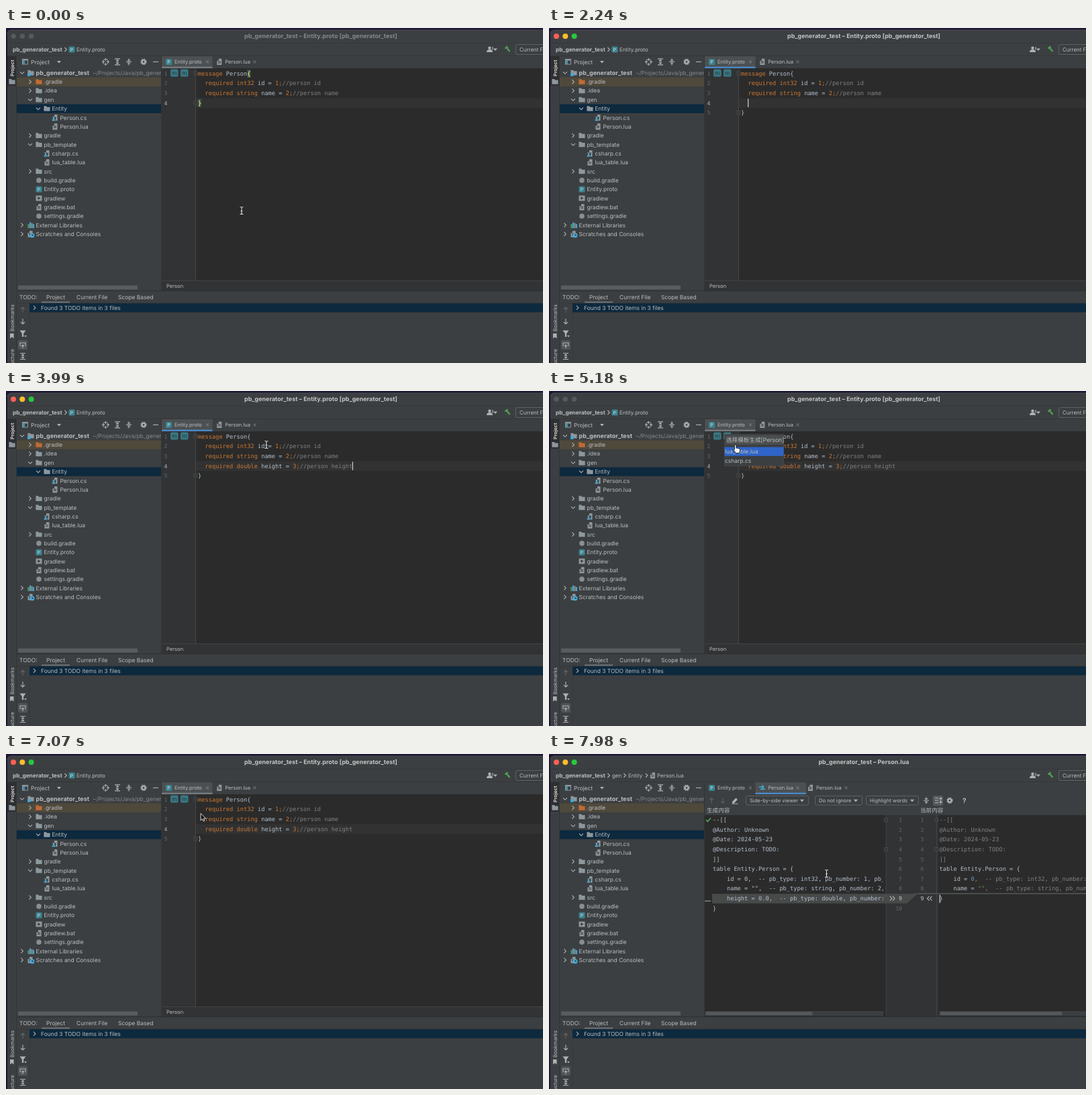
An HTML page that plays this animation: 800 px wide and 499 px high, repeating every 8 s.

```html
<!DOCTYPE html>
<html lang="en">
<head>
<meta charset="utf-8">
<title>Code generator</title>
<style>
html, body { margin: 0; width: 100%; height: 100%; overflow: hidden; background: #1d1533; }
svg { display: block; width: 100vw; height: 100vh; }
text { font: 8.45px Inter, "Noto Sans CJK SC", sans-serif; fill: #bbbdbf; white-space: pre; text-rendering: geometricPrecision; }
.b { font-weight: 700; font-size: 8.95px; }
.h { font-weight: 700; font-size: 8.3px; }
.s { font-size: 7.6px; }
.m { font-size: 7.95px; }
.c { font: 8.7px "DejaVu Sans Mono", monospace; fill: #b3bfcc; }
.n { font: 8.2px "DejaVu Sans Mono", monospace; fill: #63676a; }
.z { font-size: 8.6px; }
.l { fill: none; stroke: #afb1b3; stroke-width: 1.1; }
</style>
</head>
<body>
<svg id="stage" viewBox="0 0 800 499" preserveAspectRatio="none"></svg>
<script>
const CHAR = 5.233;
const rect = (x, y, w, h, fill, extra = '') => `<rect x="${x}" y="${y}" width="${w}" height="${h}" fill="${fill}" ${extra}/>`;
const circle = (x, y, r, fill) => `<circle cx="${x}" cy="${y}" r="${r}" fill="${fill}"/>`;
const text = (x, y, s, cls = '', extra = '') => `<text x="${x}" y="${y}" class="${cls}" ${extra}>${s}</text>`;
const line = (d, extra = '') => `<path class="l" d="${d}" ${extra}/>`;
const shape = (d, fill = '#afb1b3') => `<path d="${d}" fill="${fill}"/>`;
const group = (id, s, extra = '') => `<g id="${id}" ${extra}>${s}</g>`;
const style = s => `style="${s}"`;

// Code line: a letter before each part picks its colour.
const INK = { k: '#cc7832', p: '#b3bfcc', g: '#808080', n: '#6897bb', s: '#6a8759' };
const code = (x, y, ...parts) => text(x, y,
  parts.map(p => `<tspan fill="${INK[p[0]]}">${p.slice(1)}</tspan>`).join(''), 'c');

// Icons, centred on x, y
const right = (x, y) => line(`M${x - 1.6} ${y - 3}l3 3l-3 3`);
const down = (x, y) => line(`M${x - 3} ${y - 1.5}l3 3l3 -3`);
const drop = (x, y) => shape(`M${x - 3} ${y - 1.5}h6l-3 3.6z`);
const cross = (x, y) => line(`M${x - 2} ${y - 2}l4 4m0 -4l-4 4`, 'stroke-opacity=".4"');
const folder = (x, y, fill = '#8d979e') => shape(`M${x - 4.6} ${y - 4}h3.6l1.2 1.5h4.4v6.2h-9.2z`, fill);
const file = (x, y) => shape(`M${x - 1} ${y - 4.6}h4.5v9.2h-7v-6.2h2.5z`, '#929a9f')
  + line(`M${x - 2} ${y - .5}h4m-4 2h4`, 'style="stroke:#44484a"');
const proto = (x, y) => rect(x - 4.5, y - 4.5, 9, 9, '#3a8491', 'rx="1.5"')
  + text(x, y + 2.6, 'P', '', style('font-size:7px;fill:#d3e2e4;text-anchor:middle'));
const sharp = (x, y) => file(x, y) + rect(x - 5, y - .5, 6, 5.5, '#3c3f41') + circle(x - 2, y + 1, 1.4, '#4fb0dc') + rect(x - 4.3, y + 2.7, 4.6, 2, '#4fb0dc');
const root = (x, y) => folder(x, y) + rect(x - 5, y + .5, 4.5, 4.5, '#3fa9d6');
const shell = (x, y) => rect(x - 4.5, y - 4, 9, 8, '#8f979c') + shape(`M${x - 1.5} ${y - 2.3}l4 2.3l-4 2.3z`, '#35383a');
const gradle = (x, y) => circle(x, y, 3.8, '#878f94');
const libs = (x, y) => rect(x - 4.5, y - 1.5, 2, 6, '#50a45f') + rect(x - 2, y - 4, 2, 8.5, '#4aa6cf')
  + rect(x + .5, y - 3, 2, 7.5, '#8f979c') + rect(x + 3, y - 1.5, 2, 6, '#4aa6cf');
const scratch = (x, y) => file(x - 1, y) + circle(x + 2, y + 2, 3.4, '#45aede') + line(`M${x + 2} ${y}v2h2`, 'style="stroke:#2b3b45"');
const spread = (x, y) => line(`M${x - 4} ${y - 4.5}h8m-8 9h8M${x} ${y - 3}v6m-2 -4l2 -2l2 2m-4 2l2 2l2 -2`);
const squeeze = (x, y) => line(`M${x - 4} ${y}h8M${x} ${y - 5}v3m-2 -1l2 1.5l2 -1.5M${x} ${y + 5}v-3m-2 1l2 -1.5l2 1.5`);
const gear = (x, y) => `<circle cx="${x}" cy="${y}" r="3.7" fill="none" stroke="#afb1b3" stroke-width="1.8" stroke-dasharray="1.9 1"/>`
  + `<circle cx="${x}" cy="${y}" r="2.3" fill="none" stroke="#afb1b3" stroke-width="1.8"/>`;
const arrow = (x, y, dir, opacity = 1) => line(`M${x} ${y - 4 * dir}v${8 * dir}m-3 ${-3 * dir}l3 ${3 * dir}l3 ${-3 * dir}`, `stroke-opacity="${opacity}"`);
const fold = (x, y) => rect(x - 2.5, y - 2.5, 5, 5, '#2b2b2b', 'stroke="#545658" stroke-width=".7"')
  + line(`M${x - 1.4} ${y}h2.8`, style('stroke:#75787a;stroke-width:.6'));
const side = (x, y, s, anchor = 'start', extra = '') => text(0, 0, s, 's',
  `transform="translate(${x} ${y}) rotate(-90)" text-anchor="${anchor}" ${extra}`);

function windowFrame() {
  const lights = ['#fe5f57', '#febc2e', '#28c840'].map((c, i) => circle(11 + i * 13.3, 12.3, 4, c)).join('');
  const grey = [0, 1, 2].map(i => circle(11 + i * 13.3, 12.3, 3.8, '#56595b')).join('');
  return rect(0, 0, 800, 499, '#1d1533')
    + shape('M2 499V9q0 -6 6 -6H800V499z', '#3c3f41')
    + line('M2 9q0 -6 6 -6H800', 'style="stroke:#55585b;stroke-width:.7"')
    + group('lights', lights) + group('greys', grey)
    + text(469, 15.3, '', 'b', 'id="title" text-anchor="middle"')
    + rect(2, 22, 798, .7, '#333638') + rect(2, 41, 798, .8, '#323436')
    + text(10, 35.2, 'pb_generator_test', 'h') + right(89, 32)
    + circle(720.5, 29.7, 2.2, '#afb1b3') + shape('M716 36q0 -4 4.5 -4t4.5 4z') + line('M725 28v5', 'stroke-width="1"') + drop(729, 32)
    + line('M743.5 30.5l4 -3M745.5 29l5 6', 'style="stroke:#4f9e55;stroke-width:2.4"')
    + rect(759.5, 24.5, 50, 15, '#3c3f41', 'rx="2.5" stroke="#5e6163"') + text(765, 34.8, 'Current File', 'm');
}

function leftPanel() {
  const rows = [
    [0, root, 'v', 'pb_generator_test'], [1, folder, '>', '.gradle'], [1, folder, '>', '.idea'],
    [1, folder, 'v', 'gen'], [2, folder, 'v', 'Entity'], [3, sharp, '', 'Person.cs'], [3, file, '', 'Person.lua'],
    [1, folder, '>', 'gradle'], [1, folder, 'v', 'pb_template'], [2, sharp, '', 'csharp.cs'], [2, file, '', 'lua_table.lua'],
    [1, folder, '>', 'src'], [1, gradle, '', 'build.gradle'], [1, proto, '', 'Entity.proto'], [1, shell, '', 'gradlew'],
    [1, file, '', 'gradlew.bat'], [1, gradle, '', 'settings.gradle'], [0, libs, '>', 'External Libraries'],
    [0, scratch, '>', 'Scratches and Consoles']];
  const tree = rows.map(([depth, icon, mark, name], i) => {
    const x = 24 + depth * 12, y = 66.8 + i * 13.34;
    return (mark === '>' ? right(x, y) : mark ? down(x, y) : '')
      + icon(x + 13, y, i === 1 ? '#c06a35' : undefined) + text(x + 20.5, y + 3, name, i ? '' : 'b');
  }).join('');
  return rect(2, 42, 13, 44, '#2d2f30') + side(11.5, 72, 'Project', 'start', style('fill:#e2e3e4;font-weight:600;font-size:7.2px')) + folder(9, 80)
    + rect(15, 42, .8, 457, '#323436')
    + side(11.5, 452, 'Bookmarks') + shape('M6 455h5.5v7.5l-2.7 -2.3l-2.8 2.3z') + side(11.5, 478, 'Structure', 'end')
    + rect(24.5, 46.5, 8, 7.5, 'none', 'stroke="#8d979e"') + rect(24, 46, 9, 2.5, '#8d979e') + rect(25, 48, 3, 6, '#4b90aa')
    + text(37, 53.6, 'Project') + drop(79, 50.5)
    + line('M152.3 50.4a3.9 3.9 0 1 1 -7.8 0a3.9 3.9 0 1 1 7.8 0M148.4 45v4m0 3v4M143 50.4h4m3 0h4')
    + spread(166, 50.4) + squeeze(183, 50.4) + gear(205, 50.4) + line('M219 50.4h8')
    + rect(16, 73.5, 215.5, 13.3, '#4f493c') + rect(16, 113.5, 215.5, 13.3, '#0d293e')
    + group('', tree + text(129, 69.8, '~/Projects/Java/pb_generator_test', '', style('fill:#85898b')), 'clip-path="url(#treeClip)"')
    + rect(18, 383.5, 178, 6, '#5a5c5e', 'rx="1"') + rect(231, 42, 1, 349, '#323436');
}

function todoPanel() {
  return rect(16, 391, 784, 1, '#2d3032')
    + text(20, 404, 'TODO:') + text(60, 404, 'Project') + text(105, 404, 'Current File') + text(167, 404, 'Scope Based')
    + rect(53, 407.5, 42, 2, '#747a80') + rect(16, 409.5, 784, .7, '#323436')
    + rect(35, 410.2, 765, 13.3, '#0d293e') + right(42.5, 416.7) + text(52, 419.8, 'Found 3 TODO items in 3 files')
    + rect(35, 423, .7, 76, '#35383a')
    + arrow(25, 420, -1, .35) + arrow(25, 437, 1)
    + shape('M20.5 450.5h9l-3.3 4.5v5h-2.4v-5z') + shape('M27 458h4l-2 2.4z')
    + rect(18, 465, 14, 14, '#505456', 'rx="2"') + line('M21 474v-5h8v5M25 477v-5m-2 2l2 -2l2 2') + spread(25, 489);
}

function editor() {
  const m = x => rect(x, 61.5, 11.5, 11, '#3b7883', 'rx="2"')
    + text(x + 5.7, 69.7, 'm', '', style('font-size:8.5px;fill:#20383d;text-anchor:middle'));
  const y = i => 70.6 + i * 14.65;
  const numbers = [0, 1, 2, 3, 4].map(i => text(235.5, y(i), i + 1, 'n', `id="num${i}"`)).join('');
  return rect(232, 60, 568, 317, '#2b2b2b') + rect(232, 60, 51, 317, '#313335')
    + rect(283, 104.5, 517, 14.6, '#323232', 'id="caretRow"')
    + rect(282.2, 60, .8, 317, '#4a4c4e') + numbers + m(245) + m(260)
    + fold(282.5, 67.5) + group('foldEnd', fold(282.5, 111.4))
    + group('braces', rect(286 + 14 * CHAR, 62, 5.4, 12, '#3b514d') + rect(285.8, 105.5, 5.4, 12, '#3b514d'))
    + code(286, y(0), 'kmessage ', 'pPerson{')
    + code(286, y(1), 'k  required int32 ', 'pid = ', 'k1;', 'g//person id')
    + code(286, y(2), 'k  required string ', 'pname = ', 'k2;', 'g//person name')
    + group('added', code(286, y(3), 'k  required double ', 'pheight = ', 'k3;', 'g//person height'))
    + text(286, y(3), '}', 'c', 'id="close"')
    + group('yellow', text(286 + 14 * CHAR, y(0), '{', 'c', style('fill:#ffef28')) + text(286, y(3), '}', 'c', style('fill:#ffef28')))
    + rect(0, 0, 1.2, 12.5, '#d0d0d0', 'id="caret"')
    + rect(232, 376.5, 568, 14.5, '#313335') + rect(232, 376.3, 568, .7, '#4a4c4e') + text(239, 387.3, 'Person', 's');
}

// Editor tab: icon, name and close mark
const tab = (x, icon, name, close) => icon(x, 50.4) + text(x + 8.4, 53.2, name, 's') + cross(close, 50.4);
const activeTab = (x, fill, id) => rect(x, 42, 75.5, 18, '#4c5052') + rect(x, 57.6, 75.5, 2.4, fill, `id="${id}"`);

function protoTabs() {
  return activeTab(232, '#747a80', 'tabLine')
    + tab(242.5, proto, 'Entity.proto', 300) + tab(317.8, file, 'Person.lua', 370.5)
    + proto(98, 32) + text(105, 35.2, 'Entity.proto', 'm');
}

function popup() {
  return rect(261.5, 64.5, 88, 47, '#3c3f41', 'stroke="#494c4e" stroke-width=".7"') + rect(263, 66, 87, 14, '#4a4e50')
    + text(264, 76, '选择模板生成[Person]', 'z')
    + rect(261.5, 83.5, 88, 13.2, '#2f65ca') + text(262, 93.3, 'lua_table.lua') + text(262, 106.8, 'csharp.cs');
}

function diff() {
  const combo = (x, w, s) => rect(x + .5, 62.5, w, 13.5, '#3c3f41', 'rx="2" stroke="#5e6163"') + text(x + 6, 72, s, 's') + drop(x + w - 9, 69.3);
  const compare = (x, y) => line(`M${x - 5} ${y - 1.4}h7m-2.5 -2.5l2.5 2.5l-2.5 2.5M${x + 4} ${y + 2}h-7`, 'style="stroke:#4aa6cf;stroke-width:1.6"');
  const y = i => 101 + i * 14.63;
  const shared = ['--[[', '@Author: Unknown', '@Date: 2024-05-23', '@Description: TODO:', ']]'];
  const numbers = (x, count) => Array.from({ length: count }, (_, i) =>
    text(x, y(i), i + 1, 'n', `text-anchor="end" ${i === 8 ? style('fill:#c5c8ca') : ''}`)).join('');
  const both = (x, kind) => shared.map((s, i) => code(x, y(i), kind + s)).join('') + code(x, y(5), 'ptable Entity.Person = {');
  const left = both(244, 'p')
    + code(244, y(6), 'p    id = 0,  -- pb_type: int32, pb_number: 1, pb_desc')
    + code(244, y(7), 'p    name = "",  -- pb_type: string, pb_number: 2, pb_desc')
    + code(244, y(8), 'p    height = 0.0,  -- pb_type: double, pb_number: 3')
    + code(244, y(9), 'p}');
  const other = both(581.5, 'g')
    + code(581.5, y(6), 'p    id = ', 'n0', 'k,', 'g  -- pb_type: int32, pb_number: 1')
    + code(581.5, y(7), 'p    name = ', 's""', 'k,', 'g  -- pb_type: string, pb_number: 2')
    + code(581.5, y(8), 'p}');
  return rect(232, 42, 568, 349, '#3c3f41') + activeTab(307.5, '#4a88c7', 'diffLine')
    + tab(242.5, proto, 'Entity.proto', 300) + tab(317.8, compare, 'Person.lua', 370.5) + tab(389.5, file, 'Person.lua', 442.5)
    + arrow(242, 69.3, -1, .3) + arrow(259, 69.3, 1, .3)
    + shape('M273 71l5.5 -5.5l2.4 2.4l-5.5 5.5h-2.4z') + rect(272.5, 73.6, 9, 1, '#afb1b3')
    + combo(293, 93, 'Side-by-side viewer') + combo(396, 70, 'Do not ignore') + combo(472, 78, 'Highlight words')
    + squeeze(562, 69.3) + rect(572, 62, 15, 15, '#565a5c', 'rx="2"') + line('M575 65.5h5m-5 3.5h5m-5 3.5h5M583.5 65v8m-2 -6l2 -2l2 2m-4 4l2 2l2 -2')
    + gear(597, 69.3) + text(616, 72.6, '?', 'b', style('font-size:10px'))
    + text(235, 87, '生成内容', 'z') + text(553, 87, '当前内容', 'z')
    + rect(232, 91, 568, 300, '#2b2b2b') + rect(502, 91, 78, 300, '#313335')
    + rect(501.8, 91, .7, 300, '#4a4c4e') + rect(577, 91, .7, 300, '#4a4c4e')
    + shape('M243 208.2H533L549 207.5H800V208.5H549L533 222.6H243z', '#484a4a')
    + rect(549, 207.4, 251, 1, '#5c5f60') + rect(232, 218.5, 9, 1, '#b0b2b3')
    + line('M234 98l2.4 2.6l4.6 -5.4', 'style="stroke:#4faa57;stroke-width:1.6"')
    + group('', left, 'clip-path="url(#leftClip)"') + other + numbers(526, 10) + numbers(558.5, 9)
    + [98, 142].map(v => fold(502, v) + fold(577.3, v)).join('')
    + line('M508 212l3 3.2l-3 3.2m4 -6.4l3 3.2l-3 3.2M566.5 212l-3 3.2l3 3.2m4 -6.4l-3 3.2l3 3.2')
    + rect(581.5, 209.5, 1.2, 12.5, '#d0d0d0')
    + rect(232, 383, 266, 7, '#3c3f41') + rect(581, 383, 219, 7, '#3c3f41')
    + rect(234, 383.8, 158.5, 5.2, '#55585a') + rect(583, 383.8, 181, 5.2, '#55585a')
    + text(94, 35.2, 'gen', 'm') + right(113, 32) + text(118, 35.2, 'Entity', 'm')
    + right(145.5, 32) + file(154.5, 32) + text(161, 35.2, 'Person.lua', 'm');
}

// Pointers, with the hot spot at 0, 0
const pointers = group('beam', ['#1b1b1b', '#e6e6e6'].map((c, i) =>
    line('M-2.5 -5.5q2.5 0 2.5 1.5v8q0 1.5 -2.5 1.5M2.5 -5.5q-2.5 0 -2.5 1.5m0 8q0 1.5 2.5 1.5M-1.5 .8h3', `style="stroke:${c};stroke-width:${2.4 - 1.3 * i}"`)).join(''))
  + group('tip', '<path d="M0 0v10.5l2.5 -2.3l1.6 3.5l1.8 -.8l-1.6 -3.4h3.3z" fill="#111" stroke="#eee" stroke-width=".9"/>')
  + group('hand', '<path d="M-1 1q0 -1.4 1.2 -1.4t1.2 1.4v3.5q3 -.2 5.4 1.2q1 2.2 -.3 4.2l-.7 2h-5q-1.3 -2.3 -3.6 -4.6q.5 -1.6 1.8 -.5z" fill="#f2f2f2" stroke="#151515" stroke-width=".8"/>');

stage.innerHTML = `<defs><clipPath id="treeClip">${rect(16, 60, 215, 330)}</clipPath>
  <clipPath id="leftClip">${rect(232, 91, 266, 299)}</clipPath></defs>`
  + windowFrame() + leftPanel() + todoPanel()
  + group('editing', protoTabs() + editor()) + group('diffing', diff()) + group('menu', popup()) + group('mouse', pointers);

const CLICK = 1470, ENTER = 1960, PASTE = 3010, OPEN = 4480, PICK = 7070, DIFF = 7140, LOOP = 8000;

// Pointer path: time, x, y
const path = [[0, 351, 272], [70, 351, 272], [420, 420, 212], [840, 524, 113], [910, 526, 109], [1330, 527, 98],
  [3710, 527, 98], [3850, 475, 91], [3990, 388.5, 80], [4200, 266, 67], [4970, 266, 67], [5180, 277.5, 80.5],
  [5460, 286, 93], [5810, 286, 93], [6020, 289, 90], [6160, 289, 90], [6370, 290, 88.5], [7700, 290, 88.5],
  [7840, 337, 129], [7910, 374, 154], [7980, 413.5, 178], [8000, 413.5, 178]];

function pointerAt(t) {
  const i = Math.max(1, path.findIndex(p => p[0] > t));
  const [t0, x0, y0] = path[i - 1], [t1, x1, y1] = path[i];
  const k = (t - t0) / (t1 - t0);
  return [x0 + (x1 - x0) * k, y0 + (y1 - y0) * k];
}

const $ = id => document.getElementById(id);
const show = (id, on) => $(id).setAttribute('display', on ? 'inline' : 'none');

function draw(t) {
  const focus = t >= CLICK && t < OPEN || t >= PICK;
  const isDiff = t >= DIFF, row = t >= CLICK && t < ENTER ? 2 : 3, extra = t >= ENTER;
  show('lights', focus);
  show('greys', !focus);
  $('title').textContent = 'pb_generator_test – ' + (isDiff ? 'Person.lua' : 'Entity.proto [pb_generator_test]');
  $('title').style.fill = t >= CLICK ? '#c3c5c6' : '#85898b';
  show('editing', !isDiff);
  show('diffing', isDiff);
  show('menu', t >= OPEN && t < PICK);

  $('tabLine').setAttribute('fill', focus && t < PICK ? '#4a88c7' : '#747a80');
  $('caretRow').setAttribute('y', 60.5 + row * 14.65);
  for (let i = 0; i < 5; i++) $('num' + i).style.fill = i === row ? '#b0b1b2' : '';
  show('num4', extra);
  show('added', t >= PASTE);
  show('braces', t < CLICK);
  show('yellow', t < CLICK);
  const shift = `translate(0 ${extra ? 14.65 : 0})`;
  $('close').setAttribute('transform', shift);
  $('foldEnd').setAttribute('transform', shift);

  const [since, column] = t < ENTER ? [CLICK, 40] : t < PASTE ? [ENTER, 2] : [PASTE, 44];
  show('caret', t >= CLICK && t < OPEN && (t - since) % 980 < 490);
  $('caret').setAttribute('x', 286 + column * CHAR - .4);
  $('caret').setAttribute('y', 61.5 + row * 14.65);

  const [x, y] = pointerAt(t);
  const hand = t > 4150 && t < 5400, tip = t >= 5400 && !(isDiff && y > 91);
  show('mouse', t < ENTER || t >= 3710);
  show('hand', hand);
  show('tip', tip);
  show('beam', !hand && !tip);
  $('mouse').setAttribute('transform', `translate(${x} ${y})`);
}

function tick(now) {
  draw(now % LOOP);
  requestAnimationFrame(tick);
}
draw(0);
requestAnimationFrame(tick);
</script>
</body>
</html>
```
